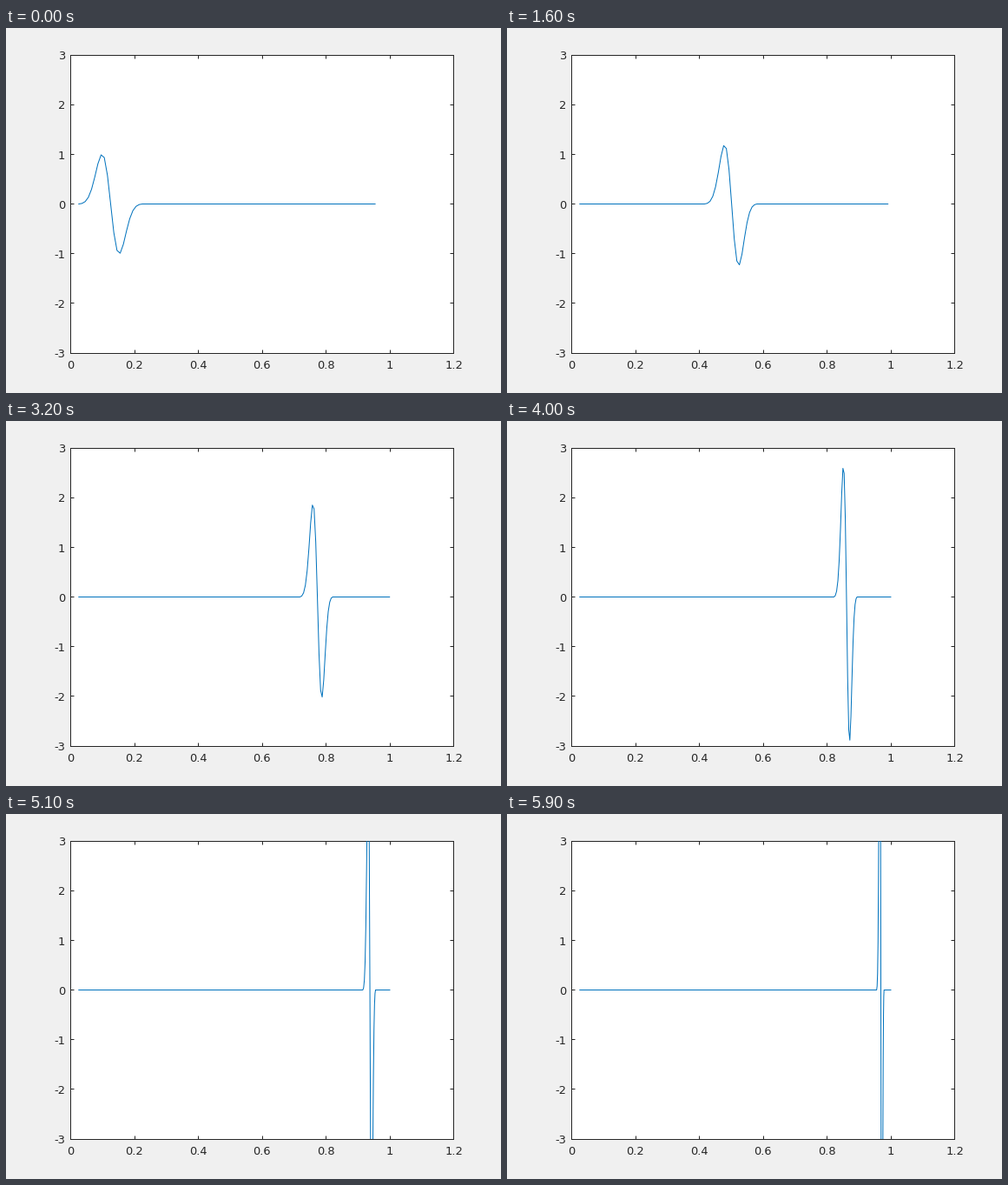
A matplotlib script for the animation above (6000 ms loop, 570 by 420 pixels).

```python
import numpy as np
import matplotlib.pyplot as plt
from matplotlib.animation import FuncAnimation
from matplotlib.transforms import Affine2D

W, H, DPI = 570, 420, 100
PX = 72 / DPI
INK = "#262626"
FONT_PX = 13
FRAMES, INTERVAL = 60, 100


def speed(x):
    """Travel speed, dropping to zero at x = 1."""
    return 0.2547 * (1 - x ** 2.18) ** 0.8


# Travel time from x = 0, tabulated with points crowding towards x = 1.
w = np.linspace(1, 0.01, 4000)
path = 1 - w ** 5
slope = 5 * w ** 4 / speed(path)
travel = np.concatenate([[0], np.cumsum((slope[1:] + slope[:-1]) / 2 * (w[0] - w[1]))])


def advance(x, t):
    return np.interp(np.interp(x, path, travel) + t, travel, path)


def pulse(x):
    d = x - 0.1
    z = d / 0.0268
    window = np.clip(1 - (d / 0.1) ** 8, 0, None)
    return -z * np.exp((1 - z ** 2) / 2) * window


start = np.arange(96) * 0.01
flux = pulse(start) * speed(start)
inlet = advance(0, INTERVAL / 1000)

fig = plt.figure(figsize=(W / 100, H / 100), dpi=DPI, facecolor="#f0f0f0")
left, bottom, right, top = 74.45, 46.45, 515.45, 389.45
ax = fig.add_axes([left / W, bottom / H, (right - left) / W, (top - bottom) / H])
ax.set(xlim=(0, 1.2), ylim=(-3, 3), facecolor="white")
ax.set_xticks(np.arange(7) * 0.2)
ax.set_yticks(range(-3, 4))
ax.tick_params(direction="in", top=True, right=True, length=4.4 * PX, width=PX,
               color=INK, labelbottom=False, labelleft=False)
for spine in ax.spines.values():
    spine.set(color=INK, linewidth=PX)


def advance_width(text):
    """Width of a number in pixels, side bearings included."""
    em = {".": 0.318, "-": 0.361}
    return FONT_PX * sum(em.get(ch, 0.636) for ch in text)


def label(text, xy, dx, dy, align):
    offset = (dx - align * advance_width(text), dy)
    ax.annotate(text, xy, xytext=offset, textcoords="offset pixels", ha="left",
                va="baseline", color=INK, family="DejaVu Sans", size=FONT_PX * PX,
                annotation_clip=False)


for i in range(7):
    label(f"{i * 0.2:.2g}", (i * 0.2, -3), 0, -18.5, 0.5)
    label(str(i - 3), (0, i - 3), -6.2, -5.75, 1)

line, = ax.plot([], [], color="#0072bd", linewidth=PX, zorder=3)
# Centre the flat part of the curve on a pixel row.
line.set_transform(ax.transData + Affine2D().translate(0, -0.45))


def draw(n):
    x = advance(start, (n + 1) * INTERVAL / 1000)
    u = flux / speed(x)
    line.set_data(np.r_[inlet, x], np.r_[0, u])
    return line,


anim = FuncAnimation(fig, draw, frames=FRAMES, interval=INTERVAL,
                     repeat=True, repeat_delay=0)
plt.show()
```
